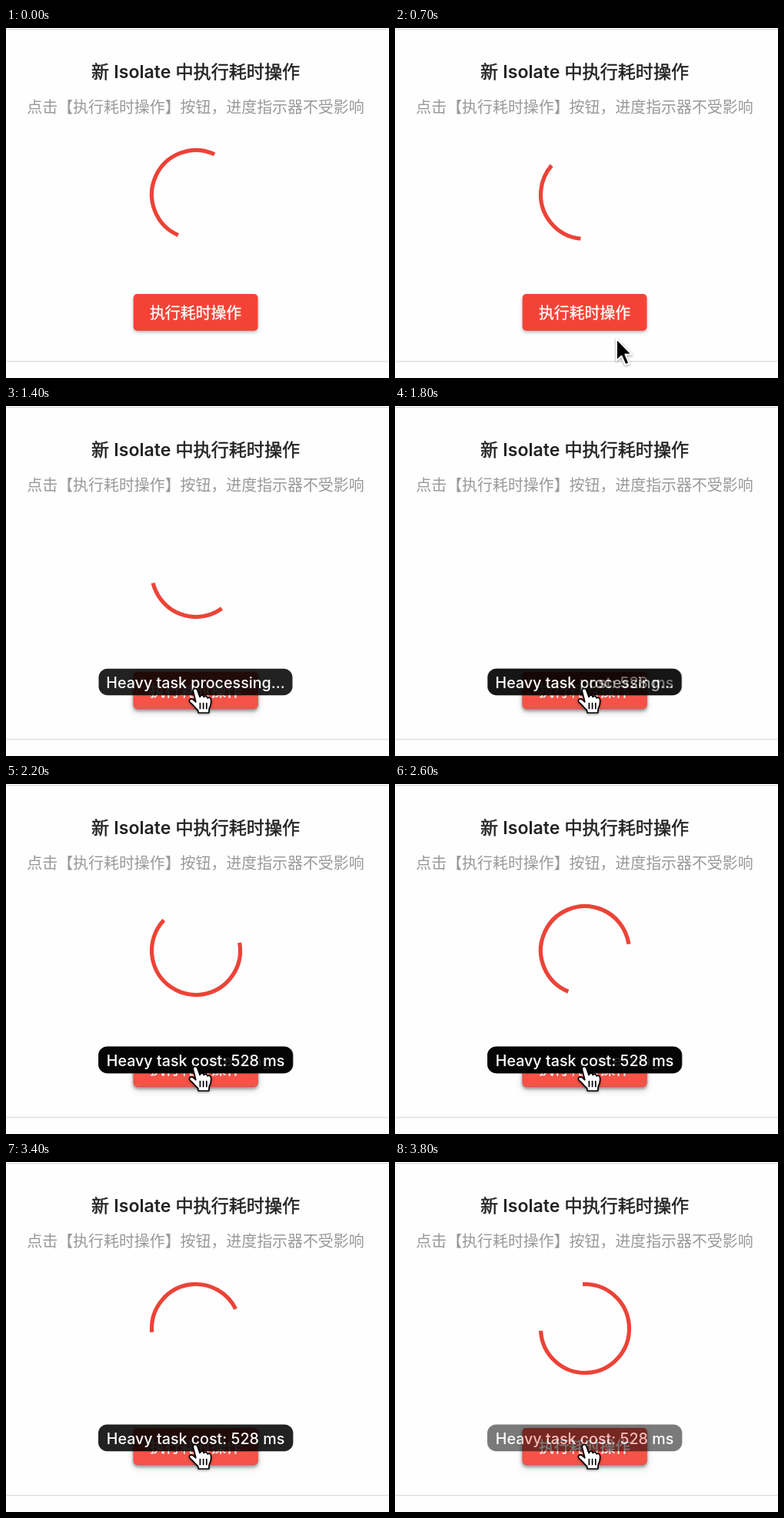
An HTML page that plays this animation: 498x454 px, repeating every 3900 ms.

```html
<!DOCTYPE html>
<html lang="zh-CN">
<meta charset="utf-8">
<style>
  html, body { margin: 0; width: 100%; height: 100%; overflow: hidden; background: #fefefe; }
  svg { display: block; }
  text { font-family: Inter, "Noto Sans CJK SC", "Noto Sans CJK", sans-serif; text-anchor: middle; }
  .button { filter: drop-shadow(0 2px 2px #0004); }
  .raised { filter: drop-shadow(0 3px 2px #0003) drop-shadow(0 4px 5px #0002); }
  .label { font-size: 19.9px; font-weight: 500; fill: #fff; stroke: #fff; stroke-width: .3; }
  .toast rect { fill: #000; fill-opacity: .867; }
  .toast text { font-size: 19.7px; font-weight: 500; fill: #fff; }
  .cursor { filter: drop-shadow(0 1.5px 1.5px #0006); stroke-linejoin: round; stroke-linecap: round; }
</style>
<svg width="498" height="454" viewBox="0 0 498 454">
  <path d="M0 1.8H498M0 432.5H498" stroke="#e0e0e0" stroke-width="1.4"/>
  <text x="246.6" y="65" font-size="23.1" font-weight="500" fill="#222" stroke="#222" stroke-width=".5">新 <tspan font-weight="600" stroke="none">Isolate</tspan> 中执行耗时操作</text>
  <text x="246.5" y="109.5" font-size="19.93" fill="#999">点击【执行耗时操作】按钮，进度指示器不受影响</text>
  <circle id="arc" cx="247" cy="216" r="57.5" pathLength="360" fill="none" stroke="#ec4337" stroke-width="5.2"/>
  <rect class="button" x="165.7" y="345" width="161.8" height="47.7" rx="5" fill="#f44336"/>
  <rect id="hover" class="raised" x="165.7" y="345" width="161.8" height="47.7" rx="5" fill="#f55347"/>
  <text class="label" x="246.6" y="376.5">执行耗时操作</text>
  <g id="processing" class="toast">
    <rect x="120.5" y="340.7" width="252" height="34.5" rx="11.5"/>
    <text x="246.5" y="366">Heavy task processing...</text>
  </g>
  <g id="cost" class="toast">
    <rect x="120" y="340.5" width="253.4" height="34.7" rx="11.5"/>
    <text x="246.5" y="366">Heavy task cost: 528 ms</text>
  </g>
  <g id="arrow" class="cursor">
    <path d="M0 0V28.5L6.5 22.5L11.5 34L16.5 32L11.5 20.5H20Z" stroke="#fff" stroke-width="2"/>
  </g>
  <g id="hand" class="cursor" fill="#fff" stroke="#000" stroke-width="1.7">
    <path d="M-3.5 3C-4.5 -.5 .3 -2 2 1.5L5.3 10.5C6 7.5 10 7.5 10.6 10.6C11.5 8.4 15 9 15.3 12C16.6 10.4 19.6 11.6 19.8 14.5C20.2 19 19.5 22 17.4 25.5L17 31H3.5L2.6 27.5C-1 24.5 -3.5 20.5 -7.2 17.6C-10.3 14.8 -7 11.6 -3.5 13.8L0 16.8Z"/>
    <path d="M5.6 18.5V25.5M9.8 18.5V25.5M14 18.5V25.5" fill="none"/>
  </g>
</svg>
<script>
  const LOOP = 3900, STEP = 100, FADE = 250;
  const el = id => document.getElementById(id);
  const clamp = x => Math.min(1, Math.max(0, x));
  const ramp = (t, start, length) => clamp((t - start) / length);

  // cubic-bezier(.4, 0, .2, 1)
  function ease(x) {
    let low = 0, high = 1, s = .5;
    for (let i = 0; i < 24; i++) {
      s = (low + high) / 2;
      const at = 1.2 * s * (1 - s) ** 2 + .6 * s * s * (1 - s) + s ** 3;
      if (at < x) low = s; else high = s;
    }
    return s * s * (3 - 2 * s);
  }

  function drawSpinner(t) {
    const phase = (t / 1333 + .643) % 1;
    const head = 270 * ease(clamp(phase * 2));
    const tail = 270 * ease(clamp(phase * 2 - 1));
    const start = -90 + tail + 90 * phase + 57 + 360 * t / 2222;
    el('arc').setAttribute('transform', `rotate(${start} 247 216)`);
    el('arc').setAttribute('stroke-dasharray', `${Math.max(head - tail, .1)} 360`);
  }

  function drawToast(id, t, start) {
    el(id).setAttribute('opacity', ramp(t, start, FADE) - ramp(t, start + 2000, FADE));
  }

  function drawCursor(t) {
    const move = ramp(t, 700, 350);
    const x = 288 - 41.2 * move, y = 403 - 36 * move;
    const over = y < 393;
    for (const [id, shown] of [['arrow', t >= 700 && !over], ['hand', over]]) {
      el(id).setAttribute('visibility', shown ? 'visible' : 'hidden');
      el(id).setAttribute('transform', `translate(${x} ${y})`);
    }
    el('hover').setAttribute('opacity', ramp(t, 790, 200));
  }

  function frame() {
    const t = Math.floor(performance.now() % LOOP / STEP) * STEP;
    drawSpinner(t);
    drawToast('processing', t, 1150);
    drawToast('cost', t, 1700);
    drawCursor(t);
    requestAnimationFrame(frame);
  }
  frame();
</script>
</html>
```
